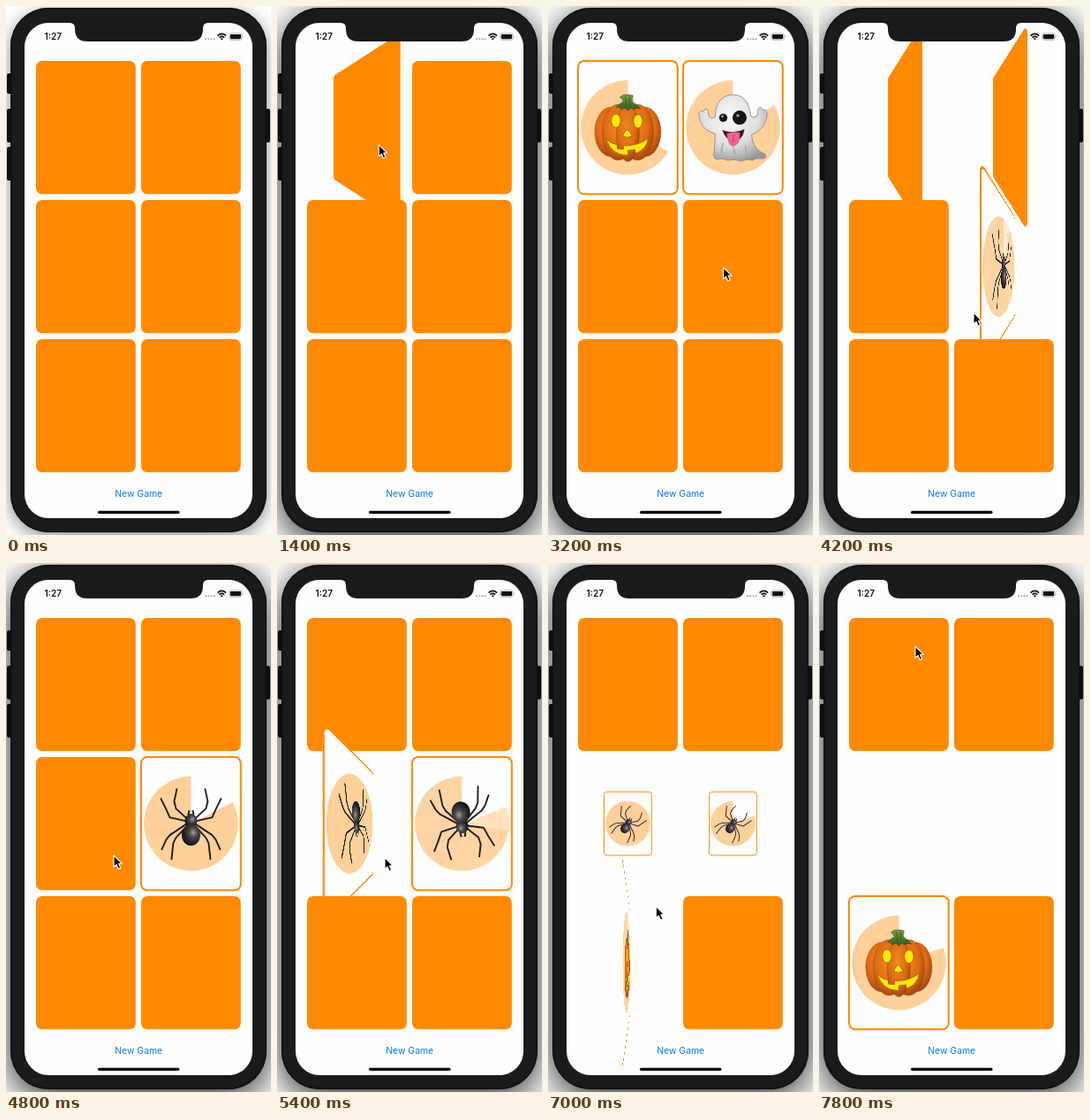
An HTML page that plays this animation: 300 px wide and 597 px high, repeating every 8000 ms.

```html
<!DOCTYPE html>
<html lang="en">
<head>
<meta charset="utf-8">
<title>Memory game</title>
<style>
  html, body { margin: 0; width: 100%; height: 100%; overflow: hidden; background: #fff; }
  #stage { position: absolute; left: 0; top: 0; width: 300px; height: 597px; overflow: hidden; background: #fff; }
  #phone, #screen, .button, .card, #overlay, #cursor { position: absolute; }
  #phone { left: 5px; top: 2px; width: 290px; height: 592px; border-radius: 43px;
    background: #1b1b1d; box-shadow: inset 0 0 2px 1px #0d0d0f, 0 5px 20px rgba(0, 0, 0, .45); }
  .active #phone { box-shadow: inset 0 0 2px 1px #0d0d0f, 0 10px 40px rgba(0, 0, 0, .85); }
  .button { width: 6px; background: #161618; border-radius: 2px; }
  #screen { left: 21px; top: 19px; width: 258px; height: 559px; border-radius: 27px; overflow: hidden; background: #fffeff; }
  .card { width: 112.8px; height: 150.2px; }
  .card svg { display: block; width: 100%; height: 100%; overflow: visible; }
  #overlay { left: 0; top: 0; }
  #cursor { left: 0; top: 0; overflow: visible; }
  text { font-family: Inter, Roboto, sans-serif; }
</style>
</head>
<body>
<div id="stage">
  <div class="button" style="left:1px;top:76px;height:23px"></div>
  <div class="button" style="left:1px;top:116px;height:38px"></div>
  <div class="button" style="left:1px;top:159px;height:38px"></div>
  <div class="button" style="left:293px;top:116px;height:38px"></div>
  <div id="phone"></div>
  <div id="screen"></div>

  <svg id="overlay" width="300" height="597">
    <defs>
      <radialGradient id="rind" cx=".45" cy=".4" r=".65">
        <stop offset="0" stop-color="#f08a20"/><stop offset=".6" stop-color="#dd6a14"/><stop offset="1" stop-color="#93400a"/>
      </radialGradient>
      <linearGradient id="stem" x2="0" y2="1">
        <stop offset="0" stop-color="#78a043"/><stop offset="1" stop-color="#2f5a1c"/>
      </linearGradient>
      <radialGradient id="sheet" cx=".45" cy=".35" r=".7">
        <stop offset="0" stop-color="#fbfbfc"/><stop offset=".6" stop-color="#dededf"/><stop offset="1" stop-color="#96969b"/>
      </radialGradient>
      <radialGradient id="shell" cx=".62" cy=".38" r=".65">
        <stop offset="0" stop-color="#a0a0a4"/><stop offset=".35" stop-color="#48484c"/><stop offset="1" stop-color="#0c0c0e"/>
      </radialGradient>

      <g id="pumpkin">
        <g fill="url(#rind)" stroke="#9c4a0c" stroke-width=".7" stroke-opacity=".6">
          <ellipse cx="-19" cy="5" rx="18.5" ry="28"/><ellipse cx="19" cy="5" rx="18.5" ry="28"/>
          <ellipse cx="-11" cy="5.500" rx="18" ry="31.500"/><ellipse cx="11" cy="5.500" rx="18" ry="31.500"/>
          <ellipse cy="6" rx="13" ry="32.500"/>
        </g>
        <path d="M-13-23Q-8-28-5-29Q-7-34-9-34Q-5-38 0-37L6-36Q4-31 6-28Q11-26 14-21Q9-23 7-20Q3-24 0-19Q-3-24-7-20Q-9-24-13-23Z" fill="url(#stem)" stroke="#31501c" stroke-width=".6"/>
        <path d="M-3-35Q-1-30-2-24M2-35Q1-30 3-24" fill="none" stroke="#31501c" stroke-width=".8"/>
        <g fill="#ffe60a" stroke="#b0640a" stroke-width="1">
          <ellipse cx="-13.500" cy="-7.500" rx="5.300" ry="7.700"/><ellipse cx="11.500" cy="-7" rx="5.300" ry="7.700"/>
          <path d="M-1 2Q-5 6-6 10Q-1 12.500 5 10Q3 5-1 2Z"/>
          <path d="M-25 12Q-20 18-12 19.500L-12 24L-5 24.500L-5 20.500Q12 21 23 12Q22 24 9 29.500L8 25L0 26L0 31.500Q-19 32-25 12Z"/>
        </g>
      </g>

      <g id="ghost">
        <path d="M0-37C12-37 19-28 20-13Q26-9 28-15C27-22 31-25 34-20C38-21 40-16 38-10C36-1 28 6 21 8C22 20 27 26 36 30C39 33 36 36 32 35Q26 34 22 37Q15 35 9 38Q1 35-6 37Q-12 34-18 36C-23 35-22 30-21 25L-20 7C-30 4-36-1-38-11C-40-17-37-20-34-18C-31-23-27-21-28-15Q-26-8-20-12C-20-28-12-37 0-37Z" fill="url(#sheet)" stroke="#858589" stroke-width=".8"/>
        <path d="M-13 29Q-13 22-11 18M2 31Q2 26 0 21M16 30Q14 26 14 20" fill="none" stroke="#a7a7ab" stroke-width="1.500"/>
        <circle cx="-11" cy="-11" r="4.700" fill="#151517"/><circle cx="7.500" cy="-11" r="8" fill="#151517"/>
        <circle cx="-12" cy="-12.500" r="1.300" fill="#aaa"/><circle cx="5.500" cy="-13.500" r="1.700" fill="#999"/>
        <path d="M-12 3Q1 8 13 2Q11 15 1 15Q-9 14-12 3Z" fill="#37191f"/>
        <path d="M-7 7Q1 4 8 6L7 16Q4 22-1 21Q-6 20-7 7Z" fill="#f0609a"/>
        <path d="M1 8L0 17" stroke="#c93a76"/>
      </g>

      <g id="spider">
        <g id="legs" fill="none" stroke="#1d1d20" stroke-width="1.900" stroke-linejoin="round" stroke-linecap="round">
          <path d="M5-6L17-17L19-25L16-39"/><path d="M6-3L24-7L28-16L34-28"/>
          <path d="M6 1L24 13L28 18L33 29"/><path d="M5 3L17 16L20 22L22 40"/>
        </g>
        <use href="#legs" transform="scale(-1 1)"/>
        <ellipse cy="-3" rx="7" ry="8" fill="url(#shell)"/>
        <path d="M-3-10L-2-15M3-10L2-15" stroke="#1d1d20" stroke-width="2"/>
        <ellipse cy="13" rx="10.500" ry="12" fill="url(#shell)"/>
      </g>
    </defs>

    <path d="M72 18V19Q78 19 78 25V26Q78 40 92 40H209Q223 40 223 26V25Q223 19 229 19V18Z" fill="#1b1b1d"/>
    <text x="43.500" y="38.300" font-size="10" font-weight="600" fill="#111">1:27</text>
    <g fill="#aaa">
      <circle cx="226" cy="37.300" r="1.100"/><circle cx="229.200" cy="37.300" r="1.100"/>
      <circle cx="232.400" cy="37.300" r="1.100"/><circle cx="235.600" cy="37.300" r="1.100"/>
    </g>
    <g fill="none" stroke="#111" stroke-width="1.600">
      <path d="M239.500 33.600Q244.300 29.200 249.100 33.600M241.400 35.700Q244.300 33.200 247.200 35.700"/>
    </g>
    <path d="M242.700 36.900Q244.300 35.600 245.900 36.900L244.300 38.600Z" fill="#111"/>
    <rect x="252.700" y="30.900" width="14.500" height="7.400" rx="2" fill="none" stroke="#999" stroke-width=".7"/>
    <rect x="253.800" y="32" width="12.300" height="5.200" rx="1.100" fill="#111"/>
    <path d="M268 33.400Q269.300 34.600 268 35.900Z" fill="#999"/>
    <text x="150.200" y="554" font-size="10.400" fill="#0a7aea" text-anchor="middle">New Game</text>
    <rect x="104" y="569.700" width="92.500" height="3.200" rx="1.600" fill="#000"/>
  </svg>

  <svg id="cursor" width="12" height="18">
    <path d="M0 0V13L3 10.300L5.200 15.300L7.700 14.200L5.500 9.300H9.400Z" fill="#000" stroke="#fff" stroke-width="1.100" stroke-linejoin="round"/>
  </svg>
</div>

<script>
const LOOP = 8000, STEP = 200, FLIP = 750;
const DEGREES_PER_MS = 360 / 6000;
const RADIUS = 53.3;
const ORANGE = '#ff8a02';
const DEPTH = 150.2;

// Times in ms at which each card turns up, turns down, is matched and is removed.
const cards = [
  { face: 'pumpkin', up: 1183, down: 3752 },
  { face: 'ghost', up: 2168, down: 3752 },
  { face: 'spider', up: 4915, match: 4915, gone: 6608 },
  { face: 'spider', up: 3752, match: 4915, gone: 6608 },
  { face: 'pumpkin', up: 6608 },
  { face: 'ghost' }
];

// Pointer path: time, x, y
const pointerPath = [
  [400, 165, 300], [1000, 112, 165], [1300, 110, 155], [2000, 205, 184], [2200, 207.5, 186.500],
  [2400, 207, 192], [3200, 198.500, 295], [3700, 196, 306], [4200, 175, 346], [4800, 122, 330],
  [5400, 122, 332.500], [6200, 123, 405], [6600, 123.500, 408], [6900, 123, 403],
  [7600, 110, 125], [7800, 109, 94]
];

const stage = document.getElementById('stage');
const screenBox = document.getElementById('screen');
const cursor = document.getElementById('cursor');

const clamp = v => Math.min(1, Math.max(0, v));
const progress = (t, start = Infinity) => clamp((t - start) / FLIP);

function piePath(gap) {
  const point = deg => {
    const a = deg * Math.PI / 180;
    return `${RADIUS * Math.sin(a)} ${-RADIUS * Math.cos(a)}`;
  };
  const large = gap < 180 ? 1 : 0;
  return `M0 0L${point(gap)}A${RADIUS} ${RADIUS} 0 ${large} 1 ${point(359.99)}Z`;
}

cards.forEach((card, i) => {
  const el = document.createElement('div');
  el.className = 'card';
  el.style.left = 13.4 + 119 * (i % 2) + 'px';
  el.style.top = 43.2 + 156.7 * Math.floor(i / 2) + 'px';
  const shape = 'x="-56.4" y="-75.1" width="112.8" height="150.2" rx="6.900"';
  el.innerHTML = `<svg viewBox="-56.4 -75.1 112.8 150.2">
    <g class="front"><rect ${shape} fill="#fffeff" stroke="${ORANGE}" stroke-width="2.060"/>
      <path class="live" fill="${ORANGE}"/><path class="still" fill="${ORANGE}"/>
      <use class="emoji" href="#${card.face}"/></g>
    <rect class="back" ${shape} fill="${ORANGE}"/></svg>`;
  screenBox.append(el);
  card.el = el;
  for (const part of ['front', 'back', 'live', 'still', 'emoji']) card[part] = el.querySelector('.' + part);
});

function setPie(path, gap, opacity) {
  path.setAttribute('d', piePath(gap));
  path.setAttribute('fill-opacity', 0.4 * opacity);
}

function drawCard(card, t) {
  const { up = Infinity, down = Infinity, match = Infinity, gone } = card;
  const angle = t < down ? 180 * (1 - progress(t, up)) : 180 * progress(t, down);
  const faceUp = angle < 90;
  const scale = 1 - progress(t, gone);
  card.el.style.transform = angle % 180
    ? `perspective(${DEPTH}px) rotateY(${angle}deg)`
    : scale < 1 ? `scale(${scale})` : 'none';
  card.front.style.display = faceUp ? '' : 'none';
  card.back.style.display = faceUp ? 'none' : '';
  if (!faceUp) return;

  // The running timer cross-fades with a still pie when it starts and stops.
  const stop = Math.min(down, match);
  const live = stop <= up ? 0 : t < stop ? progress(t, up) : 1 - progress(t, stop);
  setPie(card.live, (t - up) * DEGREES_PER_MS, live);
  setPie(card.still, t < stop ? 0 : (stop - up) * DEGREES_PER_MS, 1 - live);
  const spin = t > match ? (t - match) * 0.36 : 0;
  card.emoji.setAttribute('transform', `rotate(${spin})`);
}

function drawCursor(t) {
  cursor.style.display = t < pointerPath[0][0] ? 'none' : '';
  const next = pointerPath.findIndex(p => p[0] > t);
  const [t1, x1, y1] = pointerPath.at(next);
  const [t0, x0, y0] = next > 0 ? pointerPath[next - 1] : [t1 - 1, x1, y1];
  const k = clamp((t - t0) / (t1 - t0));
  const ease = k * k * (3 - 2 * k);
  cursor.style.transform = `translate(${x0 + (x1 - x0) * ease}px, ${y0 + (y1 - y0) * ease}px)`;
}

function draw(elapsed) {
  const t = Math.floor(elapsed % LOOP / STEP) * STEP;
  stage.classList.toggle('active', t >= 400);
  cards.forEach(card => drawCard(card, t));
  drawCursor(t);
}

const start = performance.now();
function tick() {
  draw(performance.now() - start);
  requestAnimationFrame(tick);
}
tick();
</script>
</body>
</html>
```
